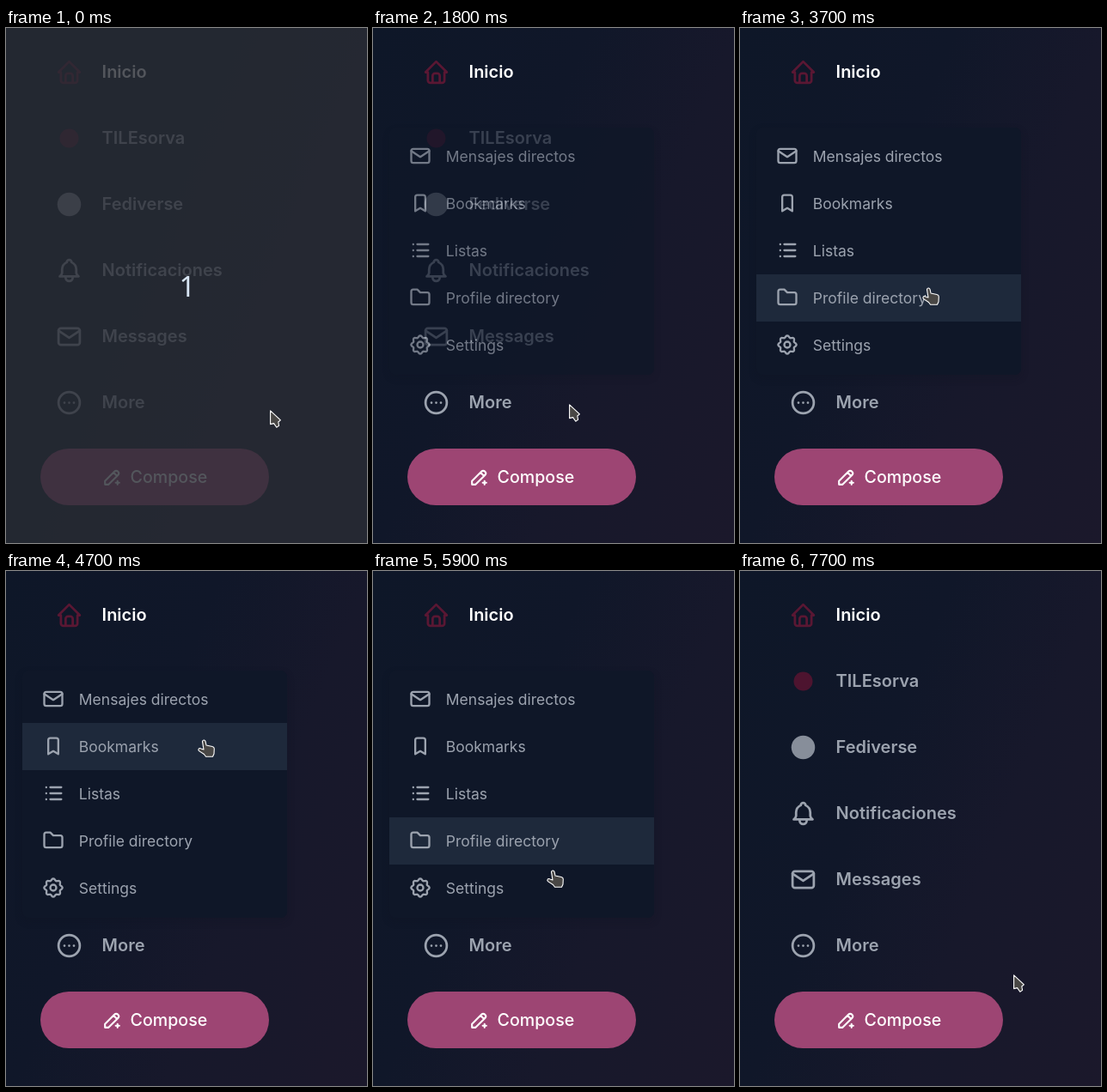
Animation, 420 px wide and 600 px high, one loop 8 s. Source, as an HTML page:

```html
<!DOCTYPE html>
<html lang="es">
<head>
<meta charset="utf-8">
<title>Menu</title>
<style>
  html, body { margin: 0; width: 100%; height: 100%; overflow: hidden; background: #101729; }
  #stage {
    position: relative; width: 420px; height: 600px; overflow: hidden;
    background: linear-gradient(112deg, #0e1728 0%, #101729 38%, #17182b 64%, #1b182b 100%);
    font-family: Inter, sans-serif; color: #9ca3af;
  }
  svg {
    position: absolute; overflow: visible; fill: none; stroke: currentColor;
    stroke-width: 2; stroke-linecap: round; stroke-linejoin: round;
  }
  .link { position: absolute; left: 0; height: 40px; font: 600 20px/40px Inter, sans-serif; }
  .link span { position: absolute; left: 111.6px; white-space: nowrap; }
  .link svg { left: 57px; top: 3.5px; width: 33px; height: 33px; }
  .active span { color: #fff; }
  .active svg, .hover svg { color: #5a1733; }
  .hover span { color: #f3f4f6; }
  #compose {
    position: absolute; left: 40px; top: 490px; width: 266px; height: 66px; border-radius: 33px;
    background: #9d4573; color: #fff; font: 500 19.6px/66px Inter, sans-serif;
  }
  #compose svg { left: 70.5px; top: 20.5px; width: 25px; height: 25px; }
  #compose span { position: absolute; left: 104.6px; }
  #menu {
    position: absolute; left: 19px; top: 116px; width: 308px; height: 288px; border-radius: 7px;
    background: #0f1728; box-shadow: 0 4px 8px rgba(14, 18, 32, .25);
  }
  .item { position: absolute; left: 0; width: 308px; height: 55px; font: 400 17.5px/55px Inter, sans-serif; }
  .item.on { background: #1e293b; }
  .item svg { left: 22px; top: 13px; width: 28px; height: 28px; }
  .item span { position: absolute; left: 65.8px; white-space: nowrap; }
  #count {
    position: absolute; inset: 0; padding-left: 2px; background: rgba(40, 44, 52, .8); color: #d8e6f5;
    font: 400 33px/602px "Noto Sans", "Open Sans", sans-serif; text-align: center;
  }
  #cursor { left: 0; top: 0; width: 20px; height: 21px; }
  #cursor path { fill: #494745; stroke: #fff; stroke-width: 1.1; }
</style>
</head>
<body>
<div id="stage">
  <div id="nav"></div>
  <div id="compose"></div>
  <div id="menu"></div>
  <div id="count">1</div>
  <svg id="cursor" viewBox="0 0 20 21">
    <path id="arrow" d="M.6 .8V16.6L4.6 15.6 7.8 20.2 10.6 18.4 9.8 14 12.4 11.8Z"/>
    <path id="hand" transform="translate(-7 -1)" d="M5.5 2.6Q5.9 .8 7.6 1 8.8 1.3 9.1 2.6L10 7 17 8.5Q19.3 9 19.3 11L19 17 17.5 20.3H9.5L7.5 17.5 1.5 13.6Q.3 12.3 1.3 11 2.5 10 4.5 11.2L7 12Z"/>
  </svg>
</div>
<script>
const $ = id => document.getElementById(id);
const clamp = v => Math.min(1, Math.max(0, v));
const path = d => `<path d="${d}"/>`;
const dot = (r, fill) => `<circle cx="12" cy="12" r="${r}" fill="${fill}" stroke="none"/>`;

function gear() {
  let d = '';
  for (let i = 0; i < 96; i++) {
    const a = i / 96 * 2 * Math.PI, r = 8.2 + 0.9 * Math.cos(8 * a);
    d += (i ? 'L' : 'M') + (12 + r * Math.cos(a)).toFixed(2) + ' ' + (12 + r * Math.sin(a)).toFixed(2);
  }
  return path(d + 'Z') + '<circle cx="12" cy="12" r="3"/>';
}

const icons = {
  home: path('M5 12H3l9-9 9 9h-2M5 12v7a2 2 0 0 0 2 2h10a2 2 0 0 0 2-2v-7M9 21v-6a2 2 0 0 1 2-2h2a2 2 0 0 1 2 2v6'),
  site: dot(8, '#4d142f'),
  net: dot(10, '#878e9a'),
  bell: path('M10 5a2 2 0 0 1 4 0a7 7 0 0 1 4 6v3a4 4 0 0 0 2 3H4a4 4 0 0 0 2-3v-3a7 7 0 0 1 4-6M9 17v1a3 3 0 0 0 6 0v-1'),
  mail: '<rect x="3" y="5" width="18" height="14" rx="2"/>' + path('M3 7l9 6 9-6'),
  more: '<circle cx="12" cy="12" r="9"/>' + path('M8 12v.01M12 12v.01M16 12v.01'),
  bookmark: path('M9 4h6a2 2 0 0 1 2 2v14l-5-3-5 3V6a2 2 0 0 1 2-2'),
  list: path('M9 6h11M9 12h11M9 18h11M5 6v.01M5 12v.01M5 18v.01'),
  folder: path('M5 4h4l3 3h7a2 2 0 0 1 2 2v8a2 2 0 0 1-2 2H5a2 2 0 0 1-2-2V6a2 2 0 0 1 2-2'),
  gear: gear(),
  pencil: path('M4 20h4L18.5 9.5a2.8 2.8 0 0 0-4-4L4 16v4M13.5 6.5l4 4M16 18h4M18 16v4')
};
const label = (icon, text) => `<svg viewBox="0 0 24 24">${icons[icon]}</svg><span>${text}</span>`;
const rows = (list, cls, top, step) => list.map(([icon, text], i) =>
  `<div class="${cls}" style="top:${top + i * step}px">${label(icon, text)}</div>`).join('');

$('nav').innerHTML = rows([
  ['home', 'Inicio'], ['site', 'TILEsorva'], ['net', 'Fediverse'],
  ['bell', 'Notificaciones'], ['mail', 'Messages'], ['more', 'More']
], 'link', 31, 77);
$('menu').innerHTML = rows([
  ['mail', 'Mensajes directos'], ['bookmark', 'Bookmarks'], ['list', 'Listas'],
  ['folder', 'Profile directory'], ['gear', 'Settings']
], 'item', 6, 55);
$('compose').innerHTML = label('pencil', 'Compose');

const more = $('nav').lastElementChild;
const items = [...$('menu').children];
$('nav').firstElementChild.classList.add('active');

const OPEN = 1800, CLOSED = 6800;
const home = { x: 307, y: 445 };
// pow > 1 speeds up, pow < 1 slows down
const moves = [
  { from: 500, to: 900, x: 228, y: 438, pow: 0.8 },
  { from: 2200, to: 2400, x: 220, y: 401, pow: 1 },
  { from: 2900, to: 3850, x: 219, y: 266, pow: 1.86 },
  { from: 4000, to: 5000, x: 236, y: 160, pow: 1.2 },
  { from: 5300, to: 5900, x: 209, y: 349, pow: 1.3 },
  { from: 5900, to: 6200, x: 209, y: 423, pow: 0.7 },
  { from: 6200, to: 6400, x: 209, y: 435, pow: 1 },
  { from: 7000, to: 7700, x: 318, y: 470, pow: 1 }
];

function pointer(t) {
  let { x, y } = home;
  for (const m of moves) {
    const k = clamp((t - m.from) / (m.to - m.from)) ** m.pow;
    x += (m.x - x) * k;
    y += (m.y - y) * k;
  }
  return { x, y };
}

const menuAlpha = t => t < OPEN ? 0 : clamp(Math.min(0.7 + (t - OPEN) / 660, (CLOSED - t) / 200));

function draw(ms) {
  const t = Math.floor(ms / 100) * 100;
  const { x, y } = pointer(t);
  const alpha = menuAlpha(t);
  // Row highlight trails the pointer slightly
  const row = alpha ? Math.floor((pointer(t - 30).y - 122) / 55) : -1;
  const onRow = row >= 0 && row < items.length;
  const onMore = !alpha && x < 306 && y > 412 && y < 460;

  $('count').style.display = t < 400 ? '' : 'none';
  $('menu').style.opacity = alpha;
  items.forEach((el, i) => el.classList.toggle('on', i === row));
  more.classList.toggle('hover', onMore);
  $('cursor').style.transform = `translate(${Math.round(x)}px, ${Math.round(y)}px)`;
  $('hand').style.display = onRow || onMore ? '' : 'none';
  $('arrow').style.display = onRow || onMore ? 'none' : '';
}

const start = performance.now();
function tick() {
  draw((performance.now() - start) % 8000);
  requestAnimationFrame(tick);
}
tick();
</script>
</body>
</html>
```
